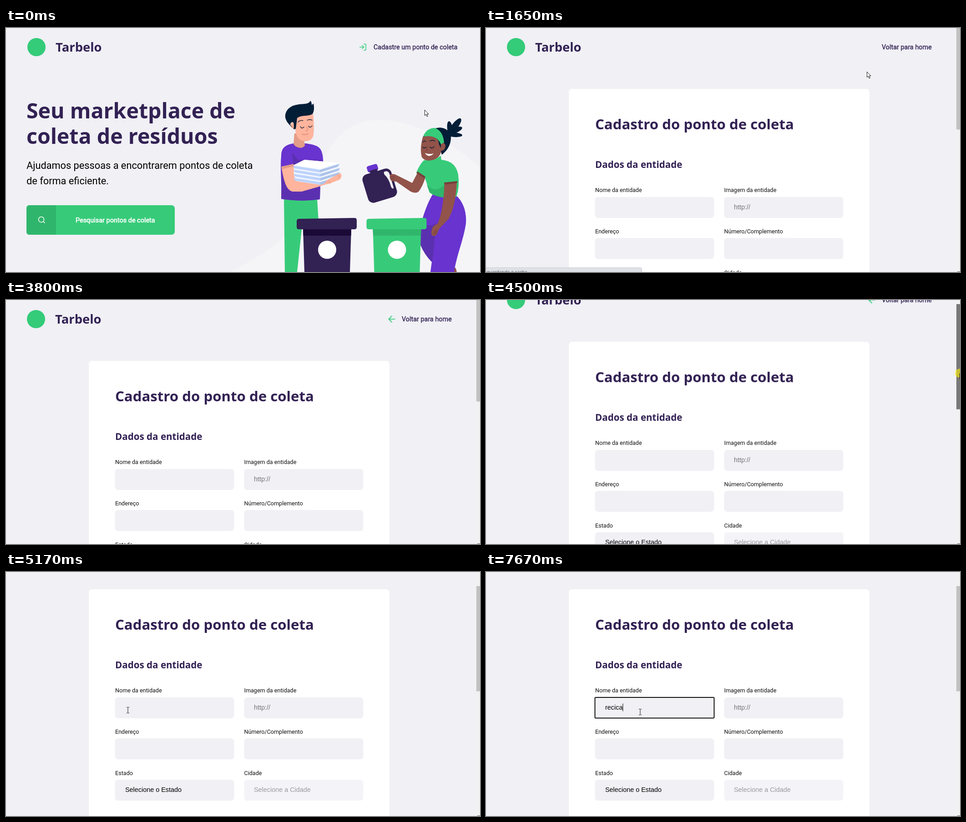
An HTML page for the animation above (8000 ms loop, 1042x537 px).

```html
<!DOCTYPE html>
<html lang="pt-BR">
<head>
<meta charset="utf-8">
<title>Pontos de coleta</title>
<style>
html, body { margin: 0; width: 100%; height: 100%; overflow: hidden; background: #f0f0f5; }
svg { display: block; width: 100%; height: 100%; }
text { font-family: Roboto, sans-serif; fill: #000; white-space: pre; }
.title { font-family: "Noto Sans", sans-serif; font-weight: 700; fill: #322153; }
.h1 { font-size: 46.5px; }
.h2 { font-size: 31.2px; }
.h3 { font-size: 20.6px; }
.brand { font-size: 27.4px; }
.lead { font-size: 21.75px; }
.link { font-size: 14.4px; fill: #322153; stroke: #322153; stroke-width: .35; }
.cta { font-size: 14.45px; fill: #fff; stroke: #fff; stroke-width: .6; }
.label { font-size: 12.6px; fill: #111; }
.value { font: 14.4px "Liberation Sans", Arial, sans-serif; }
.hint { fill: #757575; }
.off { fill: #9a9a9d; }
.tip { font: 10px "Open Sans", sans-serif; fill: #4a4d51; }
.icon { fill: none; stroke: #34cb79; stroke-width: 2; stroke-linecap: round; stroke-linejoin: round; }
.line { fill: none; stroke: #0a1c38; stroke-width: 1.3; stroke-linecap: round; }
.dark { fill: #322153; }
.ink { fill: #021e37; }
.green { fill: #37cb79; }
.shade { fill: #30b66c; }
.purple { fill: #6833cf; }
.plum { fill: #5b30b0; }
.skin { fill: #ffb49d; }
.tan { fill: #e39c87; }
.brown { fill: #92534a; }
.umber { fill: #74403a; }
.field { fill: #f0f0f5; }

.home, .form, .back, .focus, .caret, .link-tip, .wait, .wait-cache, .wait-server,
.arrow, .hand, .beam, .halo { animation: home 8s step-end infinite; }
.form { animation-name: form; }
.back { animation-name: back; }
.focus { animation-name: focus; }
.caret { animation-name: caret; }
.link-tip { animation-name: link-tip; }
.wait { animation-name: wait; }
.wait-cache { animation-name: wait-cache; }
.wait-server { animation-name: back; }
.arrow { animation-name: arrow; }
.hand { animation-name: hand; }
.beam { animation-name: beam; }
.halo { animation-name: halo; }
.typing { animation: typing 8s step-end infinite; }
.page { animation: scroll 8s linear infinite; }
.thumb { animation: thumb 8s linear infinite, press 8s step-end infinite; }
.cursor { animation: pointer 8s linear infinite; }

@keyframes home { 0% { opacity: 1 } 15.6%, 100% { opacity: 0 } }
@keyframes form { 0% { opacity: 0 } 15.6%, 100% { opacity: 1 } }
@keyframes back { 0% { opacity: 0 } 22.375%, 100% { opacity: 1 } }
@keyframes focus { 0% { opacity: 0 } 66.75%, 100% { opacity: 1 } }
@keyframes caret { 0%, 75.5% { opacity: 0 } 67.75%, 82.125%, 100% { opacity: 1 } }
@keyframes link-tip { 0%, 15.6%, 100% { opacity: 0 } 11.625% { opacity: 1 } }
@keyframes wait { 0%, 30%, 100% { opacity: 0 } 15.6% { opacity: 1 } }
@keyframes wait-cache { 0% { opacity: 1 } 22.375%, 100% { opacity: 0 } }
@keyframes arrow { 0%, 15.6%, 41.625% { opacity: 1 } 8.1%, 33.875%, 63.9%, 100% { opacity: 0 } }
@keyframes hand { 0%, 15.6%, 100% { opacity: 0 } 8.1% { opacity: 1 } }
@keyframes beam { 0% { opacity: 0 } 63.9%, 100% { opacity: 1 } }
@keyframes halo {
  0%, 12.6%, 61.75%, 67.75%, 100% { opacity: 0 }
  11.625%, 51.25%, 66.75% { opacity: .6 }
}
@keyframes press { 0%, 61.75%, 100% { fill: #c1c1c1 } 51.25% { fill: #787878 } }
@keyframes scroll {
  0%, 51.25% { transform: translateY(0) }
  56.25% { transform: translateY(-42px) }
  61%, 100% { transform: translateY(-96px) }
}
@keyframes thumb {
  0%, 51.25% { transform: translateY(-8px) }
  56.25% { transform: translateY(9px) }
  61%, 100% { transform: translateY(31px) }
}
@keyframes typing {
  0% { transform: translateX(0) }
  82.125% { transform: translateX(4.8px) }
  84.375% { transform: translateX(12.8px) }
  86.875% { transform: translateX(20px) }
  89% { transform: translateX(23.2px) }
  90.25% { transform: translateX(30.4px) }
  95.875%, 100% { transform: translateX(38.4px) }
}
@keyframes pointer {
  0%, .875% { transform: translate(920px, 180px) }
  3.5% { transform: translate(880px, 135px) }
  5.6% { transform: translate(833px, 84px) }
  7.5% { transform: translate(850px, 60px) }
  9.375%, 13.75% { transform: translate(885px, 45px) }
  19.5%, 26.125% { transform: translate(837px, 96px) }
  33.875% { transform: translate(790px, 540px) }
  33.9%, 41.6% { transform: translate(1044px, 92px) }
  41.625% { transform: translate(1036px, 92px) }
  45.375% { transform: translate(1035px, 146px) }
  47.5% { transform: translate(1044px, 146px) }
  51.25% { transform: translate(1041px, 144px) }
  56.25% { transform: translate(1041px, 161px) }
  61%, 61.75% { transform: translate(1041px, 183px) }
  64.625%, 66.75% { transform: translate(268px, 304px) }
  69.875%, 100% { transform: translate(339px, 308px) }
}
</style>
</head>
<body>
<svg viewBox="0 0 1042 537">
  <defs>
    <g id="brand">
      <circle cx="67" cy="42" r="20" fill="#34cb79"/>
      <text class="title brand" x="109" y="52">Tarbelo</text>
    </g>
    <g id="sheet">
      <path d="M632 302L690 311V317L635 308Q631 306 632 302Z" fill="#bdd3fb"/>
      <path d="M690 311L733 298L730 304L690 317Z" fill="#adc3e9"/>
    </g>
    <g id="bin">
      <path d="M653 440H759L756 537H656Z"/>
      <path d="M644 420L766 418Q771 418 771 423V438Q771 443 766 443H644Q639 443 639 438V425Q639 420 644 420Z"/>
      <circle cx="706" cy="488" r="20" fill="#fff"/>
    </g>
  </defs>

  <g class="home">
    <path d="M492 537C560 500 622 470 655 400C690 320 705 202 822 202C890 203 968 240 1042 307V537Z" fill="#f5f5f8"/>
    <use href="#brand"/>
    <path class="icon" transform="translate(775.5 33) scale(.75)" d="M15 3h4a2 2 0 0 1 2 2v14a2 2 0 0 1-2 2h-4M10 17l5-5-5-5M15 12H3"/>
    <text class="link" x="808" y="47">Cadastre um ponto de coleta</text>
    <text class="title h1" x="45" y="199">Seu marketplace de</text>
    <text class="title h1" x="45" y="255">coleta de resíduos</text>
    <text class="lead" x="45" y="310">Ajudamos pessoas a encontrarem pontos de coleta</text>
    <text class="lead" x="45" y="344">de forma eficiente.</text>
    <rect class="green" x="45" y="390" width="326" height="65" rx="7"/>
    <path class="shade" d="M110 390H52Q45 390 45 397V448Q45 455 52 455H110Z"/>
    <path class="icon" style="stroke:#fff" transform="translate(69.3 413.3) scale(.75)" d="M19 11a8 8 0 1 1-16 0a8 8 0 1 1 16 0M21 21l-4.35-4.35"/>
    <text class="cta" x="153" y="428">Pesquisar pontos de coleta</text>

    <!-- man -->
    <path class="green" d="M611 374L684 376L687 425H652L640 537H613Z"/>
    <path class="purple" d="M632 254C614 257 605 264 605 282C602 312 607 345 605 376Q648 383 690 377L691 340C699 316 698 293 696 280C693 262 685 258 660 254Z"/>
    <path class="plum" d="M606 314L633 330L691 341L690 377Q648 383 605 376Z"/>
    <path class="plum" d="M641 290Q630 273 629 276L632 303L690 310L696 290Z"/>
    <path class="tan" d="M634 232H657L656 254Q660 261 648 264Q636 263 632 255Z"/>
    <path class="skin" d="M636 194L675 189C677 206 678 226 675 239C671 249 658 252 646 246C640 242 636 230 636 222Q624 222 626 211Q630 205 637 212Z"/>
    <path class="ink" d="M631 220C620 212 612 200 614 191C616 179 626 171 639 169C652 166 666 169 669 160Q672 163 672 169Q675 168 676 166Q679 180 674 189C662 196 653 190 640 198L637 222L632 223Q634 211 631 207Q625 207 625 213Z"/>
    <path class="line" d="M642 207Q647 202 653 204M662 203Q668 200 673 203M647 217Q650 223 655 218M665 216Q669 221 673 215"/>
    <path d="M661 217Q664 224 662 226H658M650 233Q658 237 665 232" fill="none" stroke="#df8e7d" stroke-width="1.6"/>
    <path class="skin" d="M606 309L631 302C634 314 634 325 637 333L690 345L716 330L730 321L737 322Q739 328 733 334L712 342L704 344L685 350L650 360H630C617 357 611 339 606 309Z"/>
    <path class="tan" d="M605 305L632 299L633 304L606 311Z"/>
    <path d="M632 302L656 290L733 297L732 326L690 345L638 337L633 325Z" fill="#f2f6ff"/>
    <path d="M656 290L733 297L690 310L632 302Z" fill="#fff"/>
    <use href="#sheet" y="1"/>
    <use href="#sheet" x="1" y="10"/>
    <use href="#sheet" x="1" y="19"/>
    <use href="#sheet" x="1" y="28"/>
    <path class="skin" d="M711 332L735 319Q740 325 735 331L713 342L702 344Q699 339 711 332Z"/>
    <path class="line" style="stroke:#e39c87" d="M709 336L713 341M730 323L733 331"/>

    <!-- jug -->
    <g transform="translate(-3 -4) rotate(-17 822 346)">
      <rect class="purple" x="807" y="303" width="24" height="14" rx="4"/>
      <rect class="dark" x="811" y="314" width="17" height="10"/>
      <rect class="dark" x="790" y="319" width="66" height="65" rx="12"/>
      <path d="M843 325Q851 325 851 333V365Q847 369 846 360Q847 343 840 331Q839 325 843 325Z" fill="#f5f5f8"/>
    </g>

    <!-- woman -->
    <path class="brown" d="M975 518L989 529L991 537H960Z"/>
    <path class="purple" d="M938 366L989 368C1006 383 1013 406 1011 430C1006 466 992 495 985 537H933L936 515Q920 499 911 477V437C918 408 928 382 938 366Z"/>
    <path class="plum" d="M914 428Q930 440 946 430L938 510L935 514Q918 495 911 477V437Z"/>
    <path class="brown" d="M844 323Q851 319 859 324L893 341L905 318L922 329Q914 353 906 361Q898 365 888 359L858 338L848 337Q842 332 844 323Z"/>
    <path class="line" style="stroke:#74403a" d="M846 327L855 328M846 332L854 333"/>
    <path class="green" d="M919 291C912 297 905 310 902 319L921 330L930 357Q940 372 990 372Q998 349 994 322C989 298 974 292 957 290L956 281L943 289Z"/>
    <path class="shade" d="M925 345Q946 366 966 342L963 373Q942 371 931 362Z"/>
    <path class="umber" d="M902 319L905 316L922 327L920 331Z"/>
    <path class="brown" d="M964 341L991 339C990 371 984 400 973 420L952 442L946 456Q940 459 936 456Q933 449 939 437L949 430Q961 405 964 341Z"/>
    <path class="umber" d="M963 340L992 337V341L964 345Z"/>
    <path class="line" style="stroke:#74403a" d="M944 445L941 454M947 444L945 455"/>
    <g class="ink">
      <path d="M941 222C959 214 980 225 978 244C977 258 970 270 958 279L950 250Z"/>
      <ellipse cx="976" cy="222" rx="6" ry="17" transform="rotate(-8 976 222)"/>
      <ellipse cx="987" cy="216" rx="7" ry="21" transform="rotate(37 987 216)"/>
      <ellipse cx="986" cy="226" rx="6" ry="18" transform="rotate(67 986 226)"/>
      <ellipse cx="986" cy="235" rx="5" ry="17" transform="rotate(94 986 235)"/>
    </g>
    <path class="brown" d="M917 238C911 256 911 273 914 284Q920 294 936 291C948 289 955 281 957 270Q966 270 966 258Q963 250 957 255Q953 229 930 226Z"/>
    <path class="ink" d="M917 240Q922 226 938 222L956 250L956 264Q951 256 950 247Q934 231 917 240Z"/>
    <path class="green" d="M917 239Q924 220 943 220Q961 227 963 252L956 256Q947 234 917 239Z"/>
    <path class="line" d="M916 251Q919 247 923 250M932 249Q937 245 943 249M916 262Q919 266 923 262M932 262Q936 267 941 261"/>
    <path d="M927 261Q922 269 926 271" fill="none" stroke="#74403a" stroke-width="1.5"/>
    <path d="M921 275Q930 279 940 276Q935 283 927 281Q923 279 921 275Z" fill="#fff"/>

    <use href="#bin" class="dark"/>
    <path d="M653 443H759L758.5 457H653.5Z" fill="#1b0a38"/>
    <use href="#bin" x="153.5" class="green"/>
    <path class="shade" d="M806.5 443H912.5L912 457H807Z"/>
  </g>

  <g class="form">
    <g class="page">
      <use href="#brand" x="-1"/>
      <path class="icon back" transform="translate(836.6 30.6) scale(.95)" d="M19 12H5M12 19l-7-7 7-7"/>
      <text class="link" x="870" y="47">Voltar para home</text>
      <rect x="182" y="134" width="661" height="900" rx="7" fill="#fff"/>
      <text class="title h2" x="240" y="223">Cadastro do ponto de coleta</text>
      <text class="title h3" x="240" y="308">Dados da entidade</text>

      <text class="label" x="240" y="361">Nome da entidade</text>
      <rect class="field" x="239.5" y="372" width="262" height="46" rx="7"/>
      <text class="value" x="262" y="399">recica</text>
      <g class="typing">
        <rect class="field" x="262" y="382" width="42" height="24"/>
        <rect class="caret" x="262" y="385.5" width="1" height="17"/>
      </g>
      <rect class="focus" x="239.5" y="372" width="262" height="45.5" rx="2" fill="none" stroke="#101010" stroke-width="2"/>

      <text class="label" x="523.5" y="361">Imagem da entidade</text>
      <rect class="field" x="523.5" y="372" width="262" height="46" rx="7"/>
      <text class="value hint" x="545" y="399">http://</text>

      <text class="label" x="240" y="451.5">Endereço</text>
      <rect class="field" x="239.5" y="462.3" width="262" height="46" rx="7"/>
      <text class="label" x="523.5" y="451.5">Número/Complemento</text>
      <rect class="field" x="523.5" y="462.3" width="262" height="46" rx="7"/>

      <text class="label" x="240" y="542.5">Estado</text>
      <rect class="field" x="239.5" y="553.3" width="262" height="46" rx="7"/>
      <text class="value" x="262" y="580">Selecione o Estado</text>
      <text class="label" x="523.5" y="542.5">Cidade</text>
      <rect x="523.5" y="553.3" width="262" height="46" rx="7" fill="#f4f4f8"/>
      <text class="value off" x="545" y="580">Selecione a Cidade</text>
    </g>
    <rect x="1033.5" width="9" height="537" fill="#f1f1f1"/>
    <rect class="thumb" x="1034" width="8" height="231.5"/>
    <rect x="1036" y="536" width="6" height="1" fill="#505050"/>
  </g>

  <g class="link-tip">
    <path d="M-2 527.5H119Q122.500 527.5 122.500 531V540H-2Z" fill="#dee1e6" stroke="#c9ccd1"/>
    <text class="tip" x="-4" y="540.5">interno:4100/novo-registro</text>
  </g>
  <g class="wait">
    <path d="M-2 527.5H339Q342.500 527.5 342.500 531V540H-2Z" fill="#dee1e6" stroke="#c9ccd1"/>
    <text class="tip wait-cache" x="-5" y="540.5">Aguardando o cache...</text>
    <text class="tip wait-server" x="-5" y="540.5">Aguardando resposta...</text>
  </g>

  <g class="cursor">
    <circle class="halo" r="10" fill="#ffee00"/>
    <path class="arrow" d="M.5.5V12.500L3.300 10L5.300 14.800L7.300 14L5.300 9.300H9Z" fill="#fff" stroke="#000" stroke-width=".9"/>
    <path class="hand" d="M1 1Q2.500-.8 4 1V6Q6 5 6.500 7Q8.500 6 9 8Q11 7.500 11 9.500V13L9.500 18H3L-1.500 11.500Q-2 9.500 0 10L1 11Z" fill="#fff" stroke="#000" stroke-width=".9"/>
    <path class="beam" d="M-3-6.500H-1L0-5.500L1-6.500H3M0-5.500V5.500M-3 6.500H-1L0 5.500L1 6.500H3" fill="none" stroke="#111"/>
  </g>
</svg>
</body>
</html>
```
